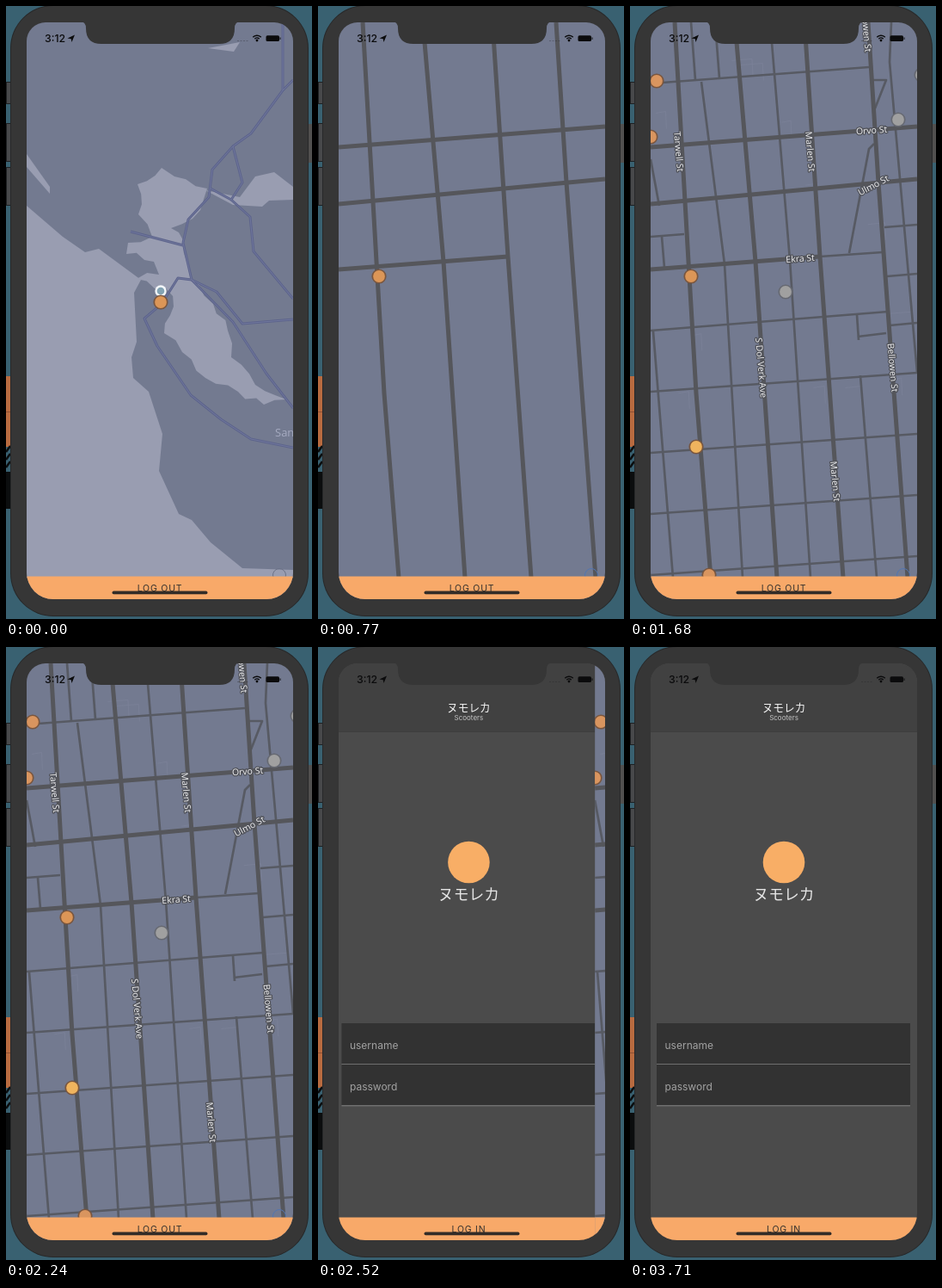
Animation, 356 px wide and 712 px high, one loop 4.62 s. Source, as an HTML page with a canvas:

```html
<!DOCTYPE html>
<html lang="en">
<head>
<meta charset="utf-8">
<title>Scooter map</title>
<style>
html, body { margin: 0; width: 100%; height: 100%; overflow: hidden; background: #396171; }
canvas { display: block; width: 356px; height: 712px; }
</style>
</head>
<body>
<canvas id="stage"></canvas>
<script>
const LOOP = 4620, STEP = 70, FLIGHT = 626, MAX_ZOOM = Math.log2(132);
const LAND = '#737a90', WATER = '#999db1', ORANGE = '#f8a969', BODY = '#363636';
const BRAND = 'ヌモレカ';
const UI = 'Inter, Roboto, sans-serif', MAP = '"Open Sans", "Noto Sans", sans-serif';
const JP = '"Noto Sans CJK JP", "Noto Sans CJK", sans-serif';

const canvas = document.getElementById('stage');
const ratio = window.devicePixelRatio || 1;
canvas.width = 356 * ratio;
canvas.height = 712 * ratio;
const ctx = canvas.getContext('2d');

const clamp = v => Math.max(0, Math.min(1, v));
const smooth = v => { v = clamp(v); return v * v * (3 - 2 * v); };
const mix = (a, b, v) => a + (b - a) * v;

function seeded(seed) {
  return () => (seed = (seed * 16807) % 2147483647) / 2147483647;
}
// Splits long edges and nudges the new points sideways, like a jagged shore.
function rough(p, amount, seed) {
  const random = seeded(seed), out = [];
  for (let i = 0; i < p.length; i += 2) {
    const x = p[i], y = p[i + 1];
    const dx = p[(i + 2) % p.length] - x, dy = p[(i + 3) % p.length] - y;
    const parts = Math.max(1, Math.round(Math.hypot(dx, dy) / 13));
    for (let j = 0; j < parts; j++) {
      const shift = j ? (random() - 0.5) * amount / Math.hypot(dx, dy) : 0;
      out.push(x + dx * j / parts - dy * shift, y + dy * j / parts + dx * shift);
    }
  }
  return out;
}

const ocean = [24,232, 66,268, 92,286, 108,282, 157,318, 149,333, 152,390, 146,408, 148,432, 166,448,
  182,497, 178,540, 201,590, 216,597, 238,623, 275,653, 334,655, 334,664, 24,664];
const bay = [152,317, 178,312, 172,297, 140,288, 142,275, 170,268, 154,242, 153,207, 181,188, 196,198,
  234,212, 217,247, 192,258, 206,272, 214,314, 241,346, 258,377, 262,408, 290,440, 326,457, 300,463,
  270,448, 232,432, 205,402, 184,380, 195,349, 186,328];
const inlets = [
  [24,172, 51,210, 51,218, 24,187],
  [232,214, 272,222, 290,198, 312,193, 334,210, 334,225, 306,226, 298,233, 264,231],
  [235,49, 272,42, 265,53]
];
const regionWater = [ocean, rough(bay, 9, 41), ...inlets];
const regionRoads = [
  [322,19, 322,98, 285,148, 264,163, 240,190, 236,222, 212,248, 206,275, 216,318],
  [264,163, 275,205, 262,225, 238,212],
  [262,225, 284,245, 288,285, 334,340],
  [145,262, 206,278],
  [216,318, 200,316, 181,346, 161,363, 176,395, 215,452, 250,480, 285,503, 334,513],
  [216,318, 264,367, 303,427, 334,467],
  [216,318, 245,332, 275,369, 334,364],
  [322,98, 334,86]
];

const cityShore = [24,222, 50,259, 105,247, 113,231, 84,186, 46,143, 111,188, 152,170, 104,111, 31,73,
  98,79, 208,92, 210,68, 186,19, 278,19, 298,110, 239,112, 212,112, 299,154, 303,206, 313,237, 300,246,
  334,250, 334,606, 317,614, 247,547, 206,540, 226,497, 200,491, 211,440, 243,432, 209,420, 242,391,
  213,373, 228,358, 212,336, 231,325, 190,275, 118,271, 112,285, 74,300, 90,492, 62,578, 69,664, 24,664];
const cityIslands = [
  [148,195, 163,183, 175,205],
  [220,245, 230,240, 244,252, 232,265],
  [275,290, 334,290, 334,321, 275,305],
  [300,247, 334,245, 334,287]
];
const cityRoads = [
  [58,19, 72,55, 105,79, 205,97, 275,115, 298,142, 318,240],
  [72,55, 65,165, 103,235, 110,275, 143,284],
  [295,19, 276,58, 300,150],
  [334,244, 285,251, 235,269, 190,323, 190,378, 148,386, 117,420, 119,475, 163,528, 195,519, 190,491,
   209,464, 190,378, 207,336, 196,318],
  [163,528, 168,570, 238,664],
  [195,519, 205,555, 282,597, 332,664],
  [318,240, 306,262, 334,287]
];

const majorStreets = [
  [52,19, 69,314, 77,450, 94,664],
  [122,19, 146,297, 171,664],
  [203,19, 221,291, 248,664],
  [277,19, 289,205, 323,664],
  [24,164, 334,140],
  [24,230, 334,201],
  [24,306, 221,291]
];
const minorStreets = [
  [24,90, 278,71], [221,291, 294,286], [71,19, 76,86], [99,19, 104,84], [83,88, 110,300, 131,664],
  [163,19, 186,295, 210,664], [24,178, 34,232], [24,268, 63,265], [37,268, 40,304], [27,378, 50,664],
  [268,429, 287,664], [255,287, 278,166, 284,160], [285,119, 298,86, 282,86],
  [304,19, 302,65, 334,425], [264,359, 266,388], [265,384, 298,380]
];
for (let i = 0; i < 5; i++) minorStreets.push([24, 377 + 71 * i, i ? 334 : 300, 355 + 71 * i]);
for (let i = 0; i < 3; i++) minorStreets.push([296 + 3 * i, 257 + 57 * i, 334, 254 + 57 * i]);

const chance = seeded(77);
const outlines = Array.from({ length: 12 }, () => {
  const x = 30 + chance() * 280, y = 50 + chance() * 580, w = 8 + chance() * 18;
  return [x, y, x + w, y - 2, x + w + 1, y + 18];
});

const DOWN = 85;
const streetLabels = [
  ['Tarwell St', 57, 169, DOWN], ['Marlen St', 210, 169, DOWN], ['Marlen St', 239, 552, DOWN],
  ['S Dol Verk Ave', 153, 420, DOWN], ['Bellowen St', 306, 420, DOWN], ['Bellowen St', 275, 25, DOWN],
  ['Orvo St', 281, 144, -4], ['Ulmo St', 283, 208, -28], ['Ekra St', 198, 293, -4]
];
const COPPER = '#d9955f', AMBER = '#f0b45e', GREY = '#a0a0a0';
const scooters = [
  [31, 87, COPPER], [24, 152, COPPER], [92, 661, COPPER], [77, 512, AMBER],
  [181, 332, GREY], [312, 132, GREY], [339, 80, GREY]
];

function trace(p, close) {
  ctx.beginPath();
  for (let i = 0; i < p.length; i += 2) ctx.lineTo(p[i], p[i + 1]);
  if (close) ctx.closePath();
}
function fillShapes(list, color) {
  ctx.fillStyle = color;
  for (const p of list) { trace(p, true); ctx.fill(); }
}
function strokeLines(list, color, width) {
  ctx.strokeStyle = color;
  ctx.lineWidth = width;
  for (const p of list) { trace(p); ctx.stroke(); }
}
function rect(x, y, w, h, color) {
  ctx.fillStyle = color;
  ctx.fillRect(x, y, w, h);
}
function pill(x, y, w, h, r, color) {
  ctx.beginPath();
  ctx.roundRect(x, y, w, h, r);
  ctx.fillStyle = color;
  ctx.fill();
}
function disc(x, y, r, color) {
  ctx.beginPath();
  ctx.arc(x, y, r, 0, 7);
  ctx.fillStyle = color;
  ctx.fill();
}
function write(str, x, y, font, color, align = 'left', spacing = 0) {
  ctx.font = font;
  ctx.fillStyle = color;
  ctx.textAlign = align;
  ctx.letterSpacing = spacing + 'px';
  ctx.fillText(str, x, y);
  ctx.letterSpacing = '0px';
}
function layer(alpha, draw) {
  if (alpha <= 0) return;
  ctx.save();
  ctx.globalAlpha = alpha;
  draw();
  ctx.restore();
}
// Draws in map coordinates, scaled by k with (ox, oy) placed at the anchor.
function mapView(anchor, k, ox, oy, draw) {
  ctx.save();
  ctx.translate(anchor.x, anchor.y);
  ctx.scale(k, k);
  ctx.translate(-ox, -oy);
  draw(1 / k);
  ctx.restore();
}

function marker(x, y, color) {
  disc(x, y, 8.6, color === GREY ? '#666972' : '#79563f');
  disc(x, y, 6.9, color);
}
function userDot(x, y, halo) {
  layer(halo, () => disc(x, y, 12, 'rgba(120,170,195,.6)'));
  disc(x, y, 6.7, '#f4f7fa');
  disc(x, y, 4.3, '#83a3b3');
}

function drawRegion(unit) {
  fillShapes(regionWater, WATER);
  strokeLines(regionRoads, '#5d648c', 3 * unit);
  strokeLines(regionRoads, '#70779c', unit);
  write('San Jose', 313, 500, `${13 * unit}px ${MAP}`, '#a6abc1');
}
function drawCity(unit, roadAlpha) {
  fillShapes([cityShore], WATER);
  fillShapes(cityIslands, LAND);
  layer(roadAlpha, () => {
    strokeLines(cityRoads, '#565d8d', 4.4 * unit);
    strokeLines(cityRoads, '#6f77ae', 2.2 * unit);
    strokeLines([[143,284, 168,284, 176,327, 190,334]], '#5c6070', 1.5 * unit);
    write('San Francisco', 78, 310, `${14 * unit}px ${MAP}`, '#656c83');
    write('Oakland', 317, 272, `${13 * unit}px ${MAP}`, '#b0b3c5');
    disc(235, 272, 8, '#7179ab');
    rect(226, 265, 18, 3, '#a9707f');
    write('80', 235, 277, `${9 * unit}px ${MAP}`, '#a6abc6', 'center');
  });
}
function drawStreets(t) {
  layer(smooth((t - 1050) / 280), () => {
    strokeLines(outlines, '#7b8298', 0.8);
    strokeLines(minorStreets, '#575a63', 2.7);
  });
  strokeLines(majorStreets, '#55565b', 5);
  layer(smooth((t - 1260) / 300), () => {
    for (const [name, x, y, angle] of streetLabels) {
      ctx.save();
      ctx.translate(x, y);
      ctx.rotate(angle * Math.PI / 180);
      ctx.font = `10.5px ${MAP}`;
      ctx.textAlign = 'center';
      ctx.strokeStyle = '#505259';
      ctx.lineWidth = 2.5;
      ctx.strokeText(name, 0, 4);
      write(name, 0, 4, ctx.font, '#f2f2f4', 'center');
      ctx.restore();
    }
  });
  for (const [x, y, color] of scooters)
    layer(smooth((t - (color === GREY ? 1050 : 820)) / 290), () => marker(x, y, color));
}

function drawMap(t) {
  rect(24, 19, 310, 670, LAND);
  const scale = 2 ** (MAX_ZOOM * smooth(t / FLIGHT));
  const start = clamp(t / 210), end = smooth((t - 210) / (FLIGHT - 210));
  const anchor = {
    x: mix(mix(180, 189, start), 71, end),
    y: mix(mix(344, 352, start), 314, end)
  };
  if (t < 210) mapView(anchor, scale, 180, 344, drawRegion);
  else if (t < FLIGHT)
    mapView(anchor, scale / 3.6, 189, 352, u => drawCity(u, 1 - smooth((t - 400) / 150)));
  layer(smooth((t - 480) / 200), () =>
    mapView(anchor, scale / 132, 71, 314, () => drawStreets(t)));
  userDot(anchor.x, anchor.y - 13 * scale, start);
  marker(anchor.x, anchor.y, '#dc9657');
  ctx.beginPath();
  ctx.arc(318, 661, 7.5, 0, 7);
  ctx.strokeStyle = t < 140 ? '#6b7186' : '#5275b0';
  ctx.lineWidth = 1;
  ctx.stroke();
  drawButton('LOG OUT');
}

function drawButton(label) {
  rect(24, 662.5, 310, 27, ORANGE);
  write(label, 179, 680, `10.5px ${UI}`, '#33302d', 'center', 0.8);
}

function drawLogin() {
  rect(24, 19, 410, 670, '#4b4b4b');
  rect(24, 19, 410, 79, '#414141');
  rect(24, 98, 410, 0.7, '#393939');
  write(BRAND, 179, 75, `12.7px ${JP}`, '#f2f2f2', 'center');
  write('Scooters', 179, 85, `8px ${UI}`, '#c4c4c4', 'center');
  disc(179, 250, 24.3, '#f8ae66');
  write(BRAND, 179, 294, `17.8px ${JP}`, '#e4e4e4', 'center');
  for (const [label, y] of [['username', 437], ['password', 485]]) {
    rect(31, y, 295, 47.5, '#323232');
    rect(31, y + 47.3, 295, 1, '#858585');
    write(label, 40.5, y + 29.5, `12px ${UI}`, '#a2a2a2');
  }
  drawButton('LOG IN');
}

// Cubic easing (0.2833, 0.99, 0.3183, 0.99) for the page transition.
function pageEase(x) {
  const curve = (a, b, s) => 3 * (1 - s) ** 2 * s * a + 3 * (1 - s) * s * s * b + s ** 3;
  let lo = 0, hi = 1;
  for (let i = 0; i < 20; i++) {
    const mid = (lo + hi) / 2;
    if (curve(0.2833, 0.31833, mid) < x) lo = mid; else hi = mid;
  }
  return x > 0 ? curve(0.99, 0.99, lo) : 0;
}

function drawStatus() {
  const ink = '#0b0b0c';
  write('3:12', 45, 42, `500 12.3px ${UI}`, ink);
  fillShapes([[71.5,37.5, 80,33.5, 76.5,42, 75.7,38.3]], ink);
  ctx.strokeStyle = ink;
  ctx.lineWidth = 1.5;
  for (const r of [3.5, 6.3]) {
    ctx.beginPath();
    ctx.arc(292, 40.5, r, -Math.PI * 0.77, -Math.PI * 0.23);
    ctx.stroke();
  }
  disc(292, 40, 1.4, ink);
  pill(302.5, 34.3, 15.5, 6.8, 1.6, ink);
  rect(318.6, 36.4, 0.9, 2.6, ink);
  for (let x = 269; x < 282; x += 3.5) rect(x, 40, 2, 1, 'rgba(30,30,35,.3)');
}

function drawBody() {
  rect(0, 0, 356, 712, '#396171');
  rect(0, 430, 8, 82, '#b96b40');
  rect(0, 471, 5, 1, '#8f5033');
  rect(0, 541, 5, 43, '#0b0d0e');
  for (let y = 518; y < 545; y += 9) strokeLines([[0, y, 5, y - 7]], '#0b0d0e', 2.5);
  for (const [y, h] of [[88, 26], [136, 45], [187, 45]]) {
    rect(0, y, 7, h, '#1d2022');
    rect(1, y + 1, 4, h - 2, '#48494b');
  }
  rect(350, 137, 6, 45, '#51504f');
  pill(5, -1, 347, 710, 50, '#272829');
  pill(6, 0, 345, 708, 49, BODY);
}

function drawNotch() {
  ctx.beginPath();
  ctx.moveTo(86, 18);
  ctx.quadraticCurveTo(93, 18, 93, 26);
  ctx.quadraticCurveTo(93, 44, 111, 44);
  ctx.lineTo(248, 44);
  ctx.quadraticCurveTo(266, 44, 266, 26);
  ctx.quadraticCurveTo(266, 18, 273, 18);
  ctx.fillStyle = BODY;
  ctx.fill();
}

function render(t) {
  ctx.setTransform(ratio, 0, 0, ratio, 0, 0);
  ctx.lineJoin = 'round';
  drawBody();
  ctx.save();
  ctx.beginPath();
  ctx.roundRect(24, 19, 310, 670, [22, 22, 31, 31]);
  ctx.clip();
  const slide = pageEase(clamp((t - 2261) / 500));
  if (slide > 0) {
    ctx.save();
    ctx.translate(-93 * (1 - slide), 0);
    drawLogin();
    ctx.restore();
  }
  if (slide < 0.999) {
    ctx.save();
    ctx.translate(310 * slide, 0);
    ctx.beginPath();
    ctx.rect(24, 19, 310, 670);
    ctx.clip();
    drawMap(t);
    ctx.restore();
  }
  drawStatus();
  pill(123.5, 679.6, 111, 3.6, 1.8, '#332c27');
  ctx.restore();
  drawNotch();
}

const began = performance.now();
function tick() {
  const t = Math.max(0, performance.now() - began) % LOOP;
  render(Math.floor(t / STEP) * STEP);
  requestAnimationFrame(tick);
}
tick();
</script>
</body>
</html>
```
